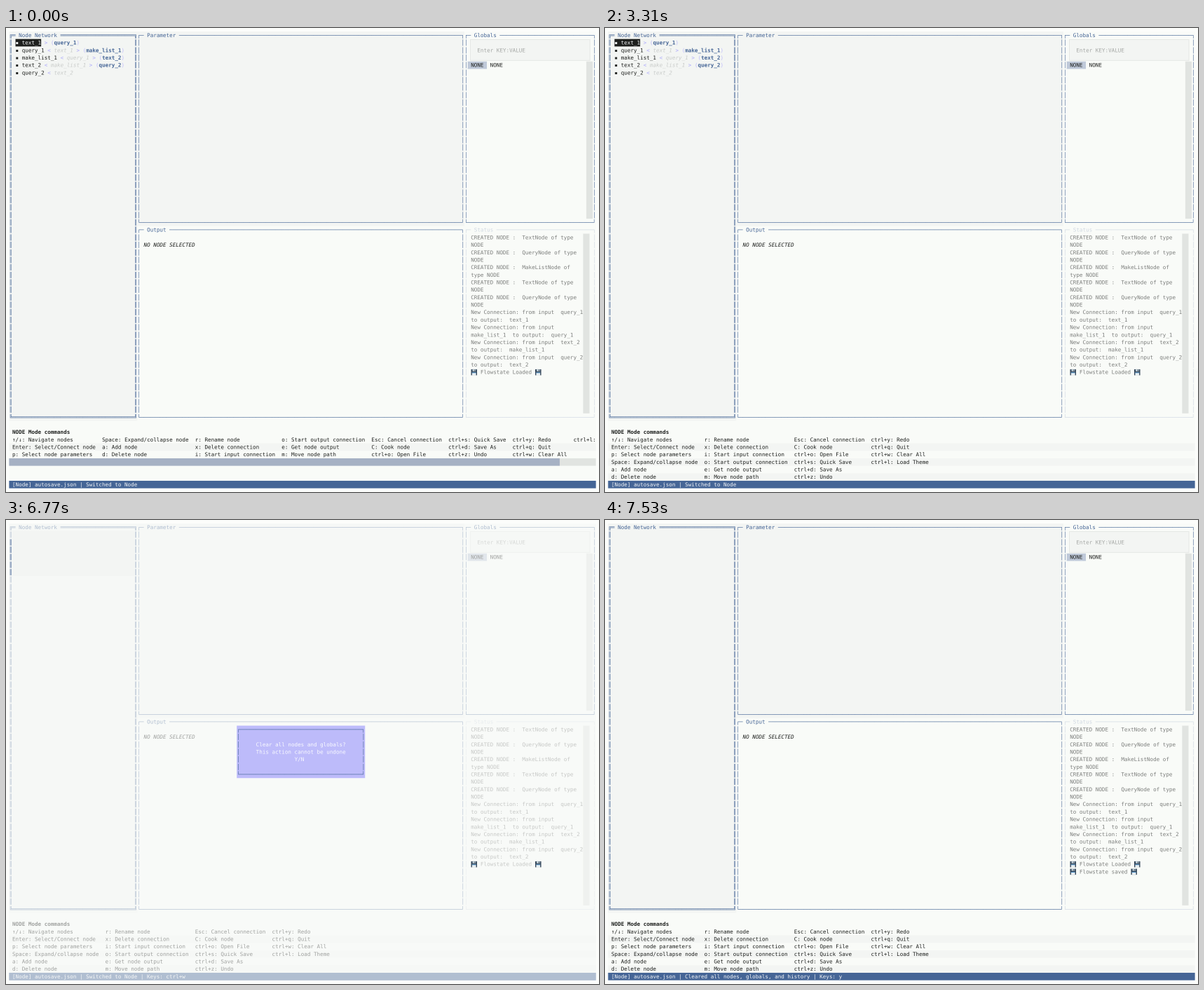
Animation, 846 px wide and 662 px high, one loop 8000 ms. Source, as an HTML page with a canvas:

```html
<!DOCTYPE html>
<html lang="en">
<head>
<meta charset="utf-8">
<title>Node editor</title>
<style>
html, body { margin: 0; width: 100%; height: 100%; overflow: hidden; background: #fcfdfb; }
canvas { display: block; width: 846px; height: 662px; }
</style>
</head>
<body>
<canvas id="term" width="1692" height="1324"></canvas>
<script>
const ctx = document.getElementById('term').getContext('2d');

// terminal grid
const COLS = 183, ROWS = 61, CW = 4.575, CH = 10.683, LEFT = 4.4, TOP = 5;
const X = c => LEFT + c * CW;
const Y = r => TOP + r * CH;

const C = {
  outer: '#fcfdfb', bg: '#f9fbf8', surface: '#f3f5f3', primary: '#456596',
  accent: '#bdbbfa', text: '#1e201e', grey: '#7d7f7d', hint: '#a5a8a5',
  faint: '#c9ccca', mute: '#d0d8e2', track: '#e1e4e1', thumb: '#a6b1c4',
  line: '#e5e8e5', key: '#bfc9d9', light: '#f4f6f8'
};

const SINGLE = '┌─┐│└┘', DOUBLE = '╔═╗║╚╝';

const COMMANDS = [
  '↑/↓: Navigate nodes', 'Enter: Select/Connect node', 'p: Select node parameters',
  'Space: Expand/collapse node', 'a: Add node', 'd: Delete node',
  'r: Rename node', 'x: Delete connection', 'i: Start input connection',
  'o: Start output connection', 'e: Get node output', 'm: Move node path',
  'Esc: Cancel connection', 'C: Cook node', 'ctrl+o: Open File',
  'ctrl+s: Quick Save', 'ctrl+d: Save As', 'ctrl+z: Undo',
  'ctrl+y: Redo', 'ctrl+q: Quit', 'ctrl+w: Clear All', 'ctrl+l: Load Theme'
];

// name, input, output
const NODES = [
  ['text_1', '', 'query_1'],
  ['query_1', 'text_1', 'make_list_1'],
  ['make_list_1', 'query_1', 'text_2'],
  ['text_2', 'make_list_1', 'query_2'],
  ['query_2', 'text_2', '']
];

const LOG = [
  'CREATED NODE :  TextNode of type', 'NODE',
  'CREATED NODE :  QueryNode of type', 'NODE',
  'CREATED NODE :  MakeListNode of', 'type NODE',
  'CREATED NODE :  TextNode of type', 'NODE',
  'CREATED NODE :  QueryNode of type', 'NODE',
  'New Connection: from input  query_1', 'to output:  text_1',
  'New Connection: from input', 'make_list_1  to output:  query_1',
  'New Connection: from input  text_2', 'to output:  make_list_1',
  'New Connection: from input  query_2', 'to output:  text_2'
];

const READY = '[Node] autosave.json | Switched to Node';
const SCENES = [
  { at: 0, rows: 3, tree: true, status: READY },
  { at: 50, rows: 6, tree: true, status: READY },
  { at: 5490, rows: 6, tree: true, dialog: true, status: READY + ' | Keys: ctrl+w' },
  { at: 6770, rows: 6, dialog: true, stale: true, status: READY + ' | Keys: ctrl+w' },
  { at: 6820, rows: 6, saved: true,
    status: '[Node] autosave.json | Cleared all nodes, globals, and history | Keys: y' }
];
const LOOP = 8000;

function fill(c, r, w, h, color) {
  ctx.fillStyle = color;
  ctx.fillRect(X(c), Y(r), w * CW, h * CH);
}

// returns the column after the text
function put(c, r, text, color = C.text, style = '') {
  ctx.font = style + ' 7.6px "DejaVu Sans Mono", monospace';
  ctx.fillStyle = color;
  ctx.fillText(text, X(c), Y(r) + 7.95);
  return c + text.length;
}

function frame(c, r, w, h, set, color, bg, title = '') {
  const [tl, hz, tr, vt, bl, br] = set;
  const label = title && ' ' + title + ' ';
  fill(c, r, w, h, bg);
  put(c, r, tl + hz, color);
  put(c + 2, r, label, color);
  put(c + 2 + label.length, r, hz.repeat(w - 3 - label.length) + tr, color);
  for (let i = 1; i < h - 1; i++) {
    put(c, r + i, vt, color);
    put(c + w - 1, r + i, vt, color);
  }
  put(c, r + h - 1, bl + hz.repeat(w - 2) + br, color);
}

function drawTree() {
  NODES.forEach(([name, input, output], i) => {
    const r = i + 1;
    if (!i) fill(2, r, 8, 1, C.text);
    let c = put(2, r, '▪ ' + name, i ? C.text : C.light);
    if (input) {
      c = put(c + 1, r, '<', C.accent, 'bold');
      c = put(c + 1, r, input, C.faint, 'italic');
    }
    if (output) {
      c = put(c + 1, r, '>', C.accent, 'bold');
      c = put(c + 1, r, '(', C.accent);
      c = put(c, r, output, C.primary, 'bold');
      put(c, r, ')', C.accent);
    }
  });
}

function drawGlobals() {
  frame(142, 0, 41, 26, SINGLE, C.primary, C.bg, 'Globals');
  ctx.fillStyle = C.line;
  ctx.fillRect(662, 16, 171.6, 30.8);
  ctx.fillStyle = C.surface;
  ctx.fillRect(663, 17, 169.6, 28.8);
  put(146, 2, 'Enter KEY:VALUE', C.hint);
  fill(143, 4, 6, 1, C.key);
  put(144, 4, 'NONE');
  put(150, 4, 'NONE');
  fill(180, 4, 2, 21, C.track);
}

function drawCommands(rows) {
  put(1, 53, 'NODE Mode commands', C.text, 'bold');
  for (let i = 1; i < rows; i += 2) fill(0, 54 + i, COLS, 1, C.surface);
  for (let i = 0, c = 1; i < COMMANDS.length; i += rows) {
    const col = COMMANDS.slice(i, i + rows);
    col.forEach((s, k) => put(c, 54 + k, s.slice(0, COLS - c)));
    c += Math.max(...col.map(s => s.length)) + 2;
  }
  if (rows === 3) {
    fill(0, 57, COLS, 1, C.track);
    fill(0, 57, 171.7, 1, C.thumb);
  }
}

function disk(c, r) {
  const x = X(c) + 0.3, y = Y(r) + 1.2;
  const box = (dx, dy, w, h, color) => {
    ctx.fillStyle = color;
    ctx.fillRect(x + dx, y + dy, w, h);
  };
  box(0, 0, 8.5, 8.5, '#35475a');
  box(2, 0, 4.8, 3, '#b8c6cf');
  box(4.9, 0.5, 1.1, 2, '#35475a');
  box(1.4, 4.4, 5.7, 4.1, '#e8eef1');
  box(1.4, 4.4, 5.7, 1, '#4a90c8');
}

function drawDialog() {
  frame(71, 27, 40, 7, SINGLE, C.primary, C.accent);
  put(77, 29, 'Clear all nodes and globals?', '#fafbff');
  put(77, 30, 'This action cannot be undone', '#fafbff');
  put(89, 31, 'Y/N', '#fafbff');
}

function draw(s) {
  ctx.setTransform(2, 0, 0, 2, 0, 0);
  ctx.textRendering = 'geometricPrecision';
  ctx.fillStyle = C.outer;
  ctx.fillRect(0, 0, 846, 662);
  fill(0, 0, COLS, ROWS, C.bg);

  frame(0, 0, 40, 52, DOUBLE, C.primary, C.surface, 'Node Network');
  if (s.tree) drawTree();
  frame(40, 0, 102, 26, SINGLE, C.primary, C.surface, 'Parameter');
  frame(40, 26, 102, 26, SINGLE, C.primary, C.bg, 'Output');
  put(42, 28, 'NO NODE SELECTED', C.text, 'italic');
  drawGlobals();

  frame(142, 26, 41, 26, SINGLE, C.mute, C.bg, 'Status');
  fill(179, 27, 2, 24, C.track);
  LOG.forEach((line, i) => put(144, 27 + i, line, C.grey));
  const notes = ['Flowstate Loaded'].concat(s.saved ? 'Flowstate saved' : []);
  notes.forEach((note, i) => put(147, 45 + i, note, C.grey));

  drawCommands(s.rows);
  fill(0, 60, COLS, 1, C.primary);
  put(1, 60, s.status, C.light);

  if (s.dialog) {
    ctx.globalAlpha = 0.6;
    fill(0, 0, COLS, ROWS, C.bg);
    ctx.globalAlpha = 1;
    drawDialog();
  }
  if (s.stale) {
    fill(1, 1, 38, 6, C.surface);
    for (let r = 2; r < 7; r++) put(0, r, '║', C.primary);
  }
  // emoji keep full colour under the dimming
  notes.forEach((note, i) => {
    disk(144, 45 + i);
    disk(148 + note.length, 45 + i);
    fill(COLS, 45 + i, 1, 1, C.bg);
  });
}

let shown;
function tick() {
  const t = performance.now() % LOOP;
  const scene = SCENES.filter(s => t >= s.at).pop();
  if (scene !== shown) draw(shown = scene);
  requestAnimationFrame(tick);
}
tick();
</script>
</body>
</html>
```
